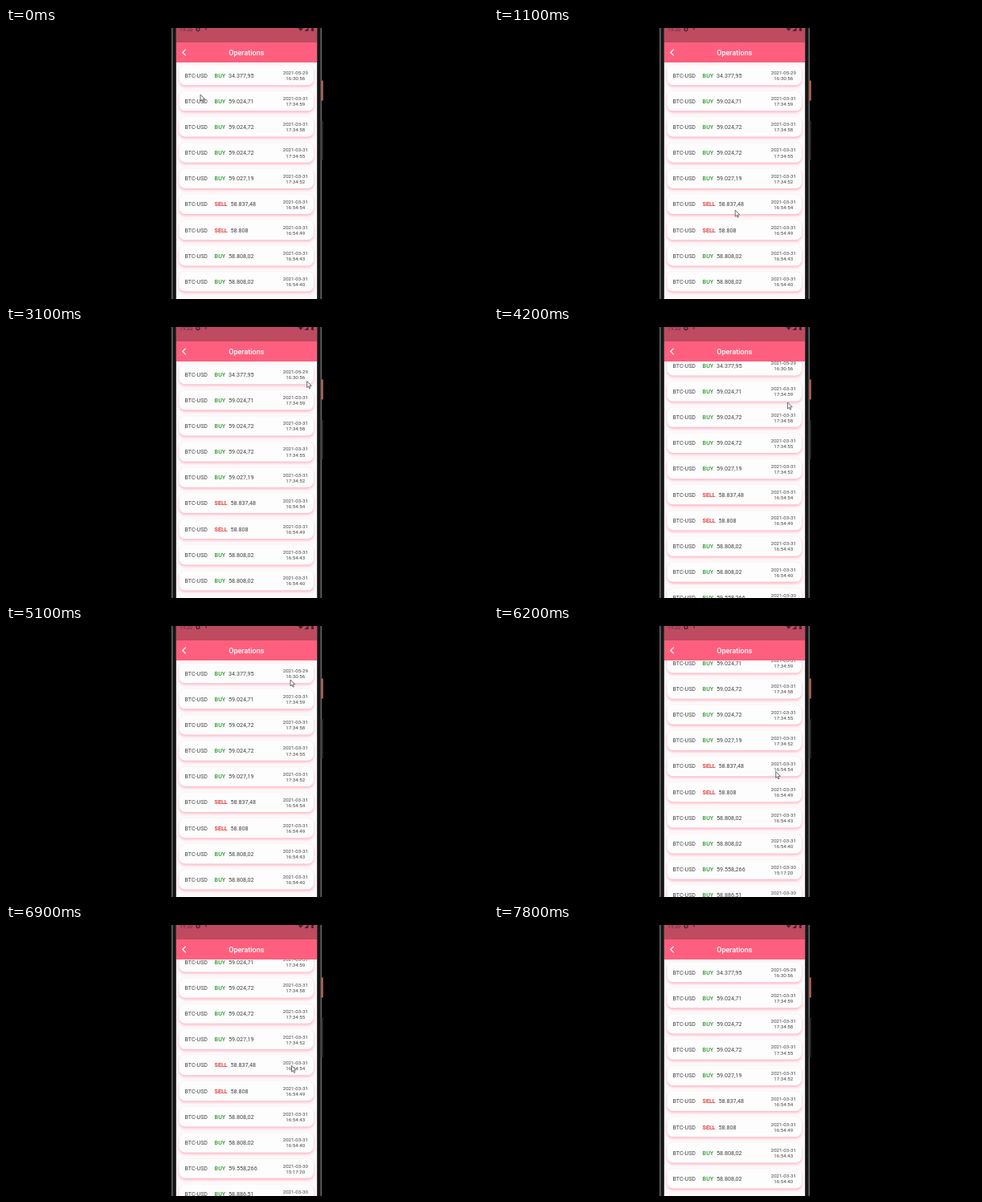
Animation, 600 px wide and 338 px high, one loop 8 s. Source, as an HTML page with a canvas:

```html
<!DOCTYPE html>
<html lang="en">
<head>
<meta charset="utf-8">
<title>Operations</title>
<style>
  html, body { margin: 0; width: 100%; height: 100%; overflow: hidden; background: #000; }
  canvas { display: block; }
</style>
</head>
<body>
<canvas id="stage" width="600" height="338"></canvas>
<script>
const c = document.getElementById('stage').getContext('2d');
const LOOP = 8000, STEP = 100, PITCH = 32.17;
const INK = '#444', DARK = '#4a2530';

const days = {
  '2021-05-29': ['BUY 34.377,95 16:30:56'],
  '2021-03-31': [
    'BUY 59.024,71 17:34:59', 'BUY 59.024,72 17:34:58', 'BUY 59.024,72 17:34:55',
    'BUY 59.027,19 17:34:52', 'SELL 58.837,48 16:54:54', 'SELL 58.808 16:54:49',
    'BUY 58.808,02 16:54:43', 'BUY 58.808,02 16:54:40'],
  '2021-03-30': [
    'BUY 59.558,266 15:17:20', 'BUY 58.886,51 15:16:46', 'SELL 59.098,52 12:26:00']
};
const rows = Object.entries(days).flatMap(([day, list]) =>
  list.map(s => [day, ...s.split(' ')]));

// Pointer stops: time, x, y
const stops = [
  [0, 242, 83], [900, 296, 240], [2100, 353, 67], [3100, 374.6, 67.6],
  [3600, 367, 135], [4200, 365.5, 94], [5100, 354, 67], [5700, 359.5, 66],
  [6000, 352, 215], [6500, 348.5, 120], [7200, 360, 211], [7700, 387, 204]
];
const arrow = new Path2D('M0 0V8L1.8 6.4 3.1 9.2 4.3 8.6 3.1 5.9 5.7 5.7Z');

function ramp(t, from, to) {
  const p = Math.min(1, Math.max(0, (t - from) / (to - from)));
  return p * p * (3 - 2 * p);
}
const pulse = (t, rise, top, fall, end) => ramp(t, rise, top) - ramp(t, fall, end);
const scrollAt = t =>
  16.5 * pulse(t, 3700, 4000, 4000, 4500) + 89.8 * pulse(t, 6000, 6400, 6700, 7100);

function pointerAt(t) {
  const i = Math.max(1, stops.findIndex(s => s[0] > t));
  const [t0, x0, y0] = stops[i - 1], [t1, x1, y1] = stops[i];
  const p = ramp(t, t0, t1);
  return [x0 + (x1 - x0) * p, y0 + (y1 - y0) * p];
}

function rect(x, y, w, h, color) {
  c.fillStyle = color;
  c.fillRect(x, y, w, h);
}

// Large type scaled down keeps subpixel glyph shapes and spacing.
function text(s, x, y, size, color, weight = 400, align = 'left') {
  c.save();
  c.translate(x, y);
  c.scale(.1, .1);
  c.font = `${weight} ${size * 10}px Roboto, sans-serif`;
  c.textAlign = align;
  c.fillStyle = color;
  c.fillText(s, 0, 0);
  const width = c.measureText(s).width / 10;
  c.restore();
  return width;
}

function path(d, fill, stroke, width) {
  const p = new Path2D(d);
  if (fill) { c.fillStyle = fill; c.fill(p); }
  if (stroke) { c.strokeStyle = stroke; c.lineWidth = width; c.stroke(p); }
}

function row([day, side, price, time], y) {
  c.save();
  c.shadowColor = 'rgba(255,95,130,.48)';
  c.shadowBlur = 3.5;
  c.shadowOffsetY = 1.8;
  c.beginPath();
  c.roundRect(215.5, y - 12.2, 167.5, 24.4, 7.5);
  c.fillStyle = '#fefdfe';
  c.fill();
  c.restore();
  text('BTC-USD', 222.5, y + 2.5, 7.1, INK);
  const w = text(side, 259.6, y + 2.5, 7.1, side === 'BUY' ? '#48a54c' : '#e2403d', 700);
  text(price, 259.6 + w + 3.8, y + 2.5, 7.2, INK);
  text(day, 360.3, y - 1.1, 6.2, INK, 400, 'center');
  text(time, 360.3, y + 6, 6.2, INK, 400, 'center');
}

function glow(edge, dir, amount) {
  const r = 270;
  c.beginPath();
  c.arc(299.5, edge + dir * (r - 34 * amount), r, 0, 7);
  c.fillStyle = `rgba(238,88,118,${.28 * amount})`;
  c.fill();
}

function phone() {
  rect(206, 0, 187, 338, '#141415');
  for (const x of [206, 391.5]) rect(x, 0, 1.5, 338, '#68686b');
  for (const x of [211, 387]) rect(x, 0, 1, 338, '#38383b');
  rect(392.6, 65.5, 2.2, 25, '#b9634d');
  rect(392.6, 116, 2.2, 49, '#29292b');
}

function header() {
  rect(212, 0, 175, 18, '#be4b60');
  rect(212, 18, 175, 25, '#ff5f7e');
  text('19:20', 216, 4.2, 6.5, '#642c3a');
  path('M237 1.5a2 2 0 1 0 4 0a2 2 0 1 0-4 0', null, DARK, 1.3);
  path('M248.3 0h1.2v2.5h-1.2zM363.5 0h6.5l-3.2 4zM371.5 4h5v-5zM380 0h3v4h-3z', DARK);
  path('M223.7 26.6l-3.9 3.9 3.9 3.9', null, '#fff', 1.3);
  text('Operations', 299.3, 33.8, 9, '#fff', 500, 'center');
}

function cursor(x, y) {
  c.save();
  c.translate(x, y);
  c.fillStyle = '#f4f2f3';
  c.fill(arrow);
  c.strokeStyle = '#505050';
  c.lineWidth = .8;
  c.stroke(arrow);
  c.restore();
}

function draw(t) {
  rect(0, 0, 600, 338, '#000');
  phone();
  c.save();
  c.beginPath();
  c.rect(212, 43, 175, 295);
  c.clip();
  rect(212, 43, 175, 295, '#fdfafb');
  rows.forEach((r, i) => row(r, 59 + i * PITCH - scrollAt(t)));
  glow(338, 1, pulse(t, 6300, 6500, 6600, 6800));
  glow(43, -1, .6 * pulse(t, 7050, 7300, 7500, 7800));
  c.restore();
  header();
  if (t < 7700) cursor(...pointerAt(t));
}

const start = performance.now();
function tick() {
  const t = (performance.now() - start) % LOOP;
  draw(Math.floor(t / STEP) * STEP);
  requestAnimationFrame(tick);
}
tick();
</script>
</body>
</html>
```
